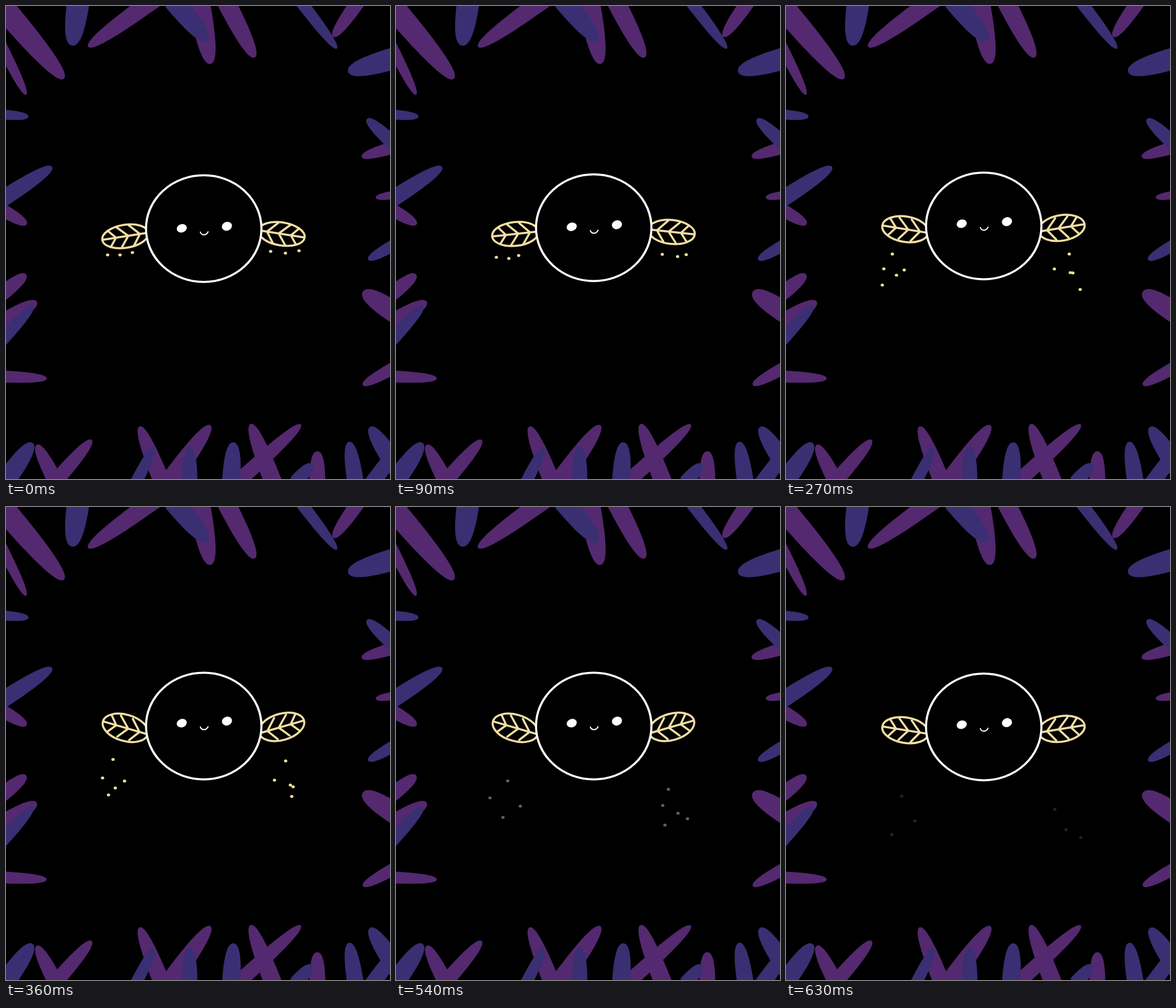
An HTML page that plays this animation: 650 px wide and 800 px high, repeating every 0.72 s.

```html
<!DOCTYPE html>
<html lang="en">
<head>
<meta charset="utf-8">
<title>Flying creature</title>
<style>
html, body { margin: 0; width: 100%; height: 100%; overflow: hidden; background: #000; }
svg { display: block; width: 650px; height: 800px; }
.wing { fill: #000; stroke: #f5dfa3; stroke-width: 3.5; stroke-linecap: round; }
</style>
</head>
<body>
<svg viewBox="0 0 650 800">
  <g id="purple" fill="#54296f"></g>
  <g id="blue" fill="#3a2f73"></g>
  <g id="left" class="wing"></g>
  <g id="right" class="wing"></g>
  <ellipse id="body" cx="334.7" cy="376.5" rx="97.7" ry="90.2" stroke="#fff" stroke-width="3.6"/>
  <g id="face" fill="#fff">
    <ellipse rx="8.7" ry="7" transform="translate(297.5 376) rotate(-20)"/>
    <ellipse rx="8.7" ry="7.4" transform="translate(374 372.5) rotate(-20)"/>
    <path d="M329 382.5C331 388.500 339 388.500 342 382" fill="none" stroke="#fff" stroke-width="2" stroke-linecap="round"/>
  </g>
  <g id="dust" fill="#f3dc9c"></g>
</svg>
<script>
const $ = id => document.getElementById(id);
const STEP = 90, COUNT = 8;

// leaves: tip x, tip y, base x, base y, width
const purple = [
  [98,123,-20,-15,39], [34,150,-8,66,18], [139,69,260,-18,30], [346,98,326,-10,37],
  [421,87,370,-12,31], [554,52,598,-10,24], [602,255,662,237,21], [626,324,660,319,14],
  [604,483,664,522,36], [604,641,664,608,21], [35,369,-10,343,22], [34,454,-10,489,25],
  [52,500,-12,538,28], [69,630,-15,626,20], [52,742,88,812,26], [145,734,80,808,25],
  [226,711,266,810,28], [346,709,268,816,32], [414,707,456,815,30], [499,708,395,802,25],
  [527,753,527,808,27]
];
const blue = [
  [112,67,123,-12,38], [341,59,283,-10,35], [560,72,497,-10,20], [579,111,662,87,37],
  [611,191,660,236,24], [613,429,662,401,20], [38,187,-10,183,17], [78,272,-15,332,28],
  [46,507,-10,568,22], [45,739,-3,806,33], [250,747,220,806,20], [311,745,311,810,26],
  [385,738,381,808,31], [518,775,490,806,24], [581,737,592,808,28], [616,712,668,790,33],
  [672,735,612,818,27]
];

function leaf([x, y, bx, by, w]) {
  const len = Math.hypot(bx - x, by - y), turn = Math.atan2(by - y, bx - x) * 180 / Math.PI;
  const h = w / 2, near = h * 0.6, bend = len / 4;
  return `<path transform="translate(${x} ${y}) rotate(${turn})"
    d="M0 0C0 ${-near} ${bend} ${-h} ${len} ${-h}V${h}C${bend} ${h} 0 ${near} 0 0"/>`;
}
$('purple').innerHTML = purple.map(leaf).join('');
$('blue').innerHTML = blue.map(leaf).join('');

// tip on the left; veins open towards the tip
$('left').innerHTML = $('right').innerHTML =
  '<ellipse rx="39.5"/><path fill="none" d="M-39 0H40' +
  'M-28 -14L-16 0L-27 14M-13 -18L5 0L-9 18M8 -18L25 0L12 18"/>';

// dust: first step, last step, x from, x to, sideways bow, y from, y to
const motes = [
  [0, 6, 172, 157, 0, 421, 512],
  [0, 7, 193, 179, 0, 421, 554],
  [0, 7, 214, 218, -16, 417, 531],
  [3, 7, 180, 196, -4, 419.5, 489],
  [3, 5, 163, 205, 0, 472, 610],
  [0, 6, 448, 449, 6, 415, 530],
  [0, 7, 473, 474, 8, 418, 546],
  [0, 7, 496, 499, -12, 414, 559],
  [3, 7, 479.5, 455, 0, 419.5, 511.5],
  [3, 6, 498, 441, 0, 479.5, 572]
];

function mote([first, last, x0, x1, bow, y0, y1], i) {
  if (i < first || i > last) return '';
  const p = (i - first) / (COUNT - 1 - first);
  const x = x0 + (x1 - x0) * p + bow * Math.sin(Math.PI * p);
  const y = y0 + (y1 - y0) * p ** 1.6;
  return `<ellipse cx="${x}" cy="${y}" rx="2.8" ry="2.5"/>`;
}

const move = (id, x, y, rest = '') =>
  $(id).setAttribute('transform', `translate(${x} ${y}) ${rest}`);

function draw(i) {
  const lift = Math.min(i, 10 - i) / 5;
  const tilt = 9 - 28 * lift * lift * (3 - 2 * lift);
  move('body', 0, -7.5 * lift);
  move('face', 0, -13 * lift);
  move('left', 202, 389.5 - 20 * lift, `rotate(${-tilt})`);
  move('right', 466.5, 385.5 - 17 * lift, `scale(-1 1) rotate(${-tilt})`);
  for (const id of ['left', 'right']) $(id).firstChild.setAttribute('ry', 19.5 + 3.5 * lift);
  $('dust').innerHTML = motes.map(m => mote(m, i)).join('');
  $('dust').setAttribute('opacity', Math.min(1, 1 - 0.28 * (i - 4)));
}

function tick() {
  draw(Math.floor(performance.now() / STEP) % COUNT);
  requestAnimationFrame(tick);
}
tick();
</script>
</body>
</html>
```
